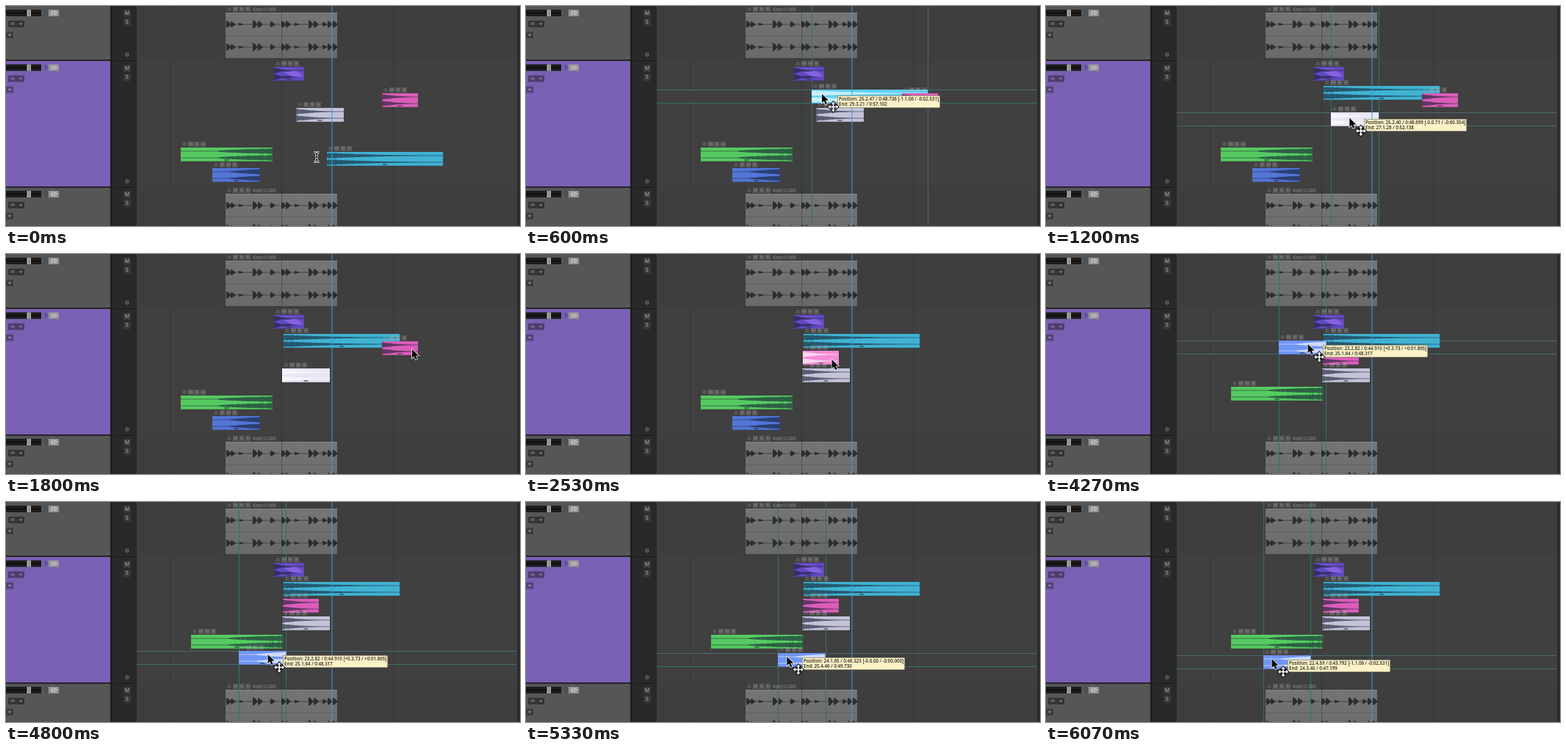
Write an HTML page with a canvas that moves like this. It is 700x300 px and loops after 6.13 s.

```html
<!DOCTYPE html>
<html>
<head>
<meta charset="utf-8">
<style>
html, body { margin: 0; width: 100%; height: 100%; overflow: hidden; background: #3f3f3f; }
canvas { display: block; }
</style>
</head>
<body>
<canvas id="stage" width="700" height="300"></canvas>
<script>
const ctx = document.getElementById('stage').getContext('2d');
const LOOP = 6130, STEP = 1000 / 15, ITEM_H = 19;
const SANS = '"Open Sans", "Noto Sans", sans-serif';

const decay = k => u => Math.pow(1 - u, k);
const rise = (from, k) => u => u < from ? 0 : Math.pow((u - from) / (1 - from), k);
const items = {
  purple: { x: 365, y: 83, w: 41, color: '#6249c0', lit: '#8b72ee', env: u => Math.max(0, 1 - u * 1.5) * (0.4 + 0.6 * Math.abs(Math.cos(u * 6))) },
  cyan: { x: 436.84, y: 199, w: 158.12, color: '#40b2d3', lit: '#5fd0f3', env: decay(2.3) },
  white: { x: 395, y: 139, w: 65, color: '#c4c3da', lit: '#e8e6f5', env: decay(2.4) },
  pink: { x: 512, y: 119, w: 49, color: '#da5db9', lit: '#f58bd8', env: decay(2.4) },
  green: { x: 237.84, y: 193, w: 124.85, color: '#55ca61', lit: '#72e67d', env: rise(0.4, 0.6) },
  blue: { x: 281.44, y: 221, w: 64.39, color: '#5275d8', lit: '#6f95f6', env: rise(0.35, 0.8) }
};

// path: [ms, item x, item y]; grab: pointer offset in the item; tip: tooltip offset
const drags = [
  { id: 'cyan', grab: [14, 6], tip: [35, 8], path: [[190, 436.84, 199], [400, 408, 150], [600, 389, 114], [800, 378, 109]] },
  { id: 'white', grab: [25, 8], tip: [45, 9], path: [[1070, 395, 139], [1400, 375.5, 156]] },
  { id: 'pink', grab: [41, 11], tip: [62, 12], path: [[1870, 512, 119], [2500, 377, 132]] },
  { id: 'green', grab: [97, 5], tip: [115, 7], path: [[3000, 237.84, 193], [3333, 248.84, 191], [3600, 252, 181]] },
  { id: 'blue', grab: [40, 5], tip: [60, 6], path: [[3930, 281.44, 221], [4267, 316.69, 118], [4400, 316.69, 118], [4800, 316.69, 203], [5000, 343.4, 206]] },
  { id: 'blue', grab: [12, 5], tip: [33, 6], path: [[5330, 343.4, 206], [5930, 295.56, 209], [6130, 295.56, 209]] }
];

const noise = n => { const s = Math.sin(n * 127.1) * 43758.5453; return s - Math.floor(s); };
const mix = (a, b, k) => a + (b - a) * k;

function along(path, t) {
  if (t <= path[0][0]) return path[0].slice(1);
  for (let i = 1; i < path.length; i++) {
    const [t0, x0, y0] = path[i - 1], [t1, x1, y1] = path[i];
    if (t < t1) {
      let k = (t - t0) / (t1 - t0);
      k = k * k * (3 - 2 * k);
      return [mix(x0, x1, k), mix(y0, y1, k)];
    }
  }
  return path[path.length - 1].slice(1);
}

function rect(x, y, w, h, color) {
  ctx.fillStyle = color;
  ctx.fillRect(x, y, w, h);
}

function label(text, x, y, size, color, weight = 400, align = 'left') {
  ctx.font = `${weight} ${size}px ${SANS}`;
  ctx.textAlign = align;
  ctx.textBaseline = 'middle';
  ctx.fillStyle = color;
  ctx.fillText(text, x, y);
}

function shape(points, fill, stroke, width = 1) {
  ctx.beginPath();
  points.forEach(([x, y]) => ctx.lineTo(x, y));
  ctx.closePath();
  if (stroke) { ctx.strokeStyle = stroke; ctx.lineWidth = width; ctx.stroke(); }
  ctx.fillStyle = fill;
  ctx.fill();
}

function ring(x, y, r, color) {
  ctx.beginPath();
  ctx.arc(x, y, r, 0, 7);
  ctx.strokeStyle = color;
  ctx.lineWidth = 1;
  ctx.stroke();
}

function itemIcons(x, y) {
  x = Math.round(x);
  y = Math.round(y);
  ctx.beginPath();
  ctx.arc(x + 5, y - 4.5, 2.8, 0, 7);
  ctx.fillStyle = 'rgba(160,160,160,.22)';
  ctx.fill();
  ['M', 'N', 'A'].forEach((c, i) => {
    const left = x + 10 + i * 8.5;
    rect(left, y - 8, 7, 7, 'rgba(170,170,170,.24)');
    label(c, left + 3.5, y - 4.3, 5.5, 'rgba(190,190,190,.55)', 400, 'center');
  });
}

function trackPanel(top, bottom, origin, color) {
  rect(0, top, 142, bottom - top, color);
  rect(0, origin + 5, 48, 9, '#1b1b1b');
  rect(0, origin + 9, 47, 1, '#050505');
  rect(28.5, origin + 5, 5.5, 9, '#a6a6a6');
  rect(31, origin + 5, 1, 9, '#777');
  rect(53, origin + 5, 1, 9, '#30516b');
  rect(55, origin + 7, 1, 5, '#30516b');
  rect(58, origin + 5, 14, 9, '#969696');
  rect(62, origin + 7, 1, 5, '#ddd');
  ring(66.5, origin + 9.5, 2, '#ddd');
  rect(3, origin + 20, 22, 9, 'rgba(0,0,0,.38)');
  label('IN', 6, origin + 24.6, 5.5, '#aaa');
  shape([[18, origin + 23.5], [22, origin + 23.5], [20, origin + 26]], '#999');
  rect(0, origin + 35, 10, 9, 'rgba(0,0,0,.3)');
  shape([[3, origin + 38.5], [7, origin + 38.5], [5, origin + 41]], '#aaa');
}

function trackButtons(top, end) {
  ['M', 'S'].forEach((c, i) => {
    rect(160, top + 5 + i * 12, 10, 10, '#393939');
    label(c, 165, top + 10.4 + i * 12, 7, '#a5a5a5', 600, 'center');
  });
  ring(165, end - 7, 2.3, '#777');
  shape([[163, end - 5], [167, end - 9]], '#777', '#777', 0.8);
}

function drumClip(y) {
  const x = 299, w = 152, h = 62;
  const shade = ctx.createLinearGradient(0, y, 0, y + h);
  shade.addColorStop(0, '#757575');
  shade.addColorStop(1, '#696969');
  rect(x, y, w, h, shade);
  rect(x, y, w, 1, '#828282');
  rect(x, y + 31, w, 1, '#616161');
  // [offset, loudness] of each drum hit
  const hits = [[2, 5], [8, 4], [19, 2], [38, 6], [45, 5], [62, 4], [77, 5], [83, 5], [95, 2], [114, 6], [121, 5], [133, 3], [140, 5], [147, 5]];
  for (const mid of [y + 16, y + 47]) {
    rect(x, mid - 0.5, w, 1, '#454545');
    for (const [dx, a] of hits)
      shape([[x + dx - 1, mid - a], [x + dx + 1.5, mid - a * 0.8], [x + dx + 6, mid], [x + dx + 1.5, mid + a * 0.8], [x + dx - 1, mid + a]], '#2d2d2d');
  }
  itemIcons(x, y);
  label('Rate:0.686', 336, y - 4, 6.5, '#929292');
}

function itemBody(item, x, y, selected) {
  const { w, env } = item;
  rect(x, y, w, ITEM_H, selected ? item.lit : item.color);
  ctx.save();
  ctx.beginPath();
  ctx.rect(x, y, w, ITEM_H);
  ctx.clip();
  if (item === items.purple) {
    ctx.beginPath();
    ctx.moveTo(x + w * 0.35, y + 2);
    ctx.quadraticCurveTo(x + w * 0.8, y + 2, x + w, y + 15);
    ctx.quadraticCurveTo(x + w * 0.65, y + 15, x + w * 0.35, y + 8);
    ctx.fillStyle = '#8462e0';
    ctx.fill();
  }
  const ink = selected ? 'rgba(255,255,255,.65)' : 'rgba(22,32,50,.62)';
  for (const mid of [y + 5, y + 14]) {
    for (let i = 0; i < w; i++) {
      const a = 0.4 + 3.8 * env(i / w) * (0.7 + 0.3 * noise(i + Math.round(w)));
      rect(x + i, mid - a, 1, a * 2, ink);
    }
  }
  rect(x, y + ITEM_H - 1, w, 1, 'rgba(0,0,0,.15)');
  rect(x + w / 2 - 3, y + ITEM_H - 3, 6, 2, 'rgba(50,50,60,.55)');
  ctx.restore();
}

function guides(x, y, w) {
  for (const gx of [x, x + w]) rect(Math.round(gx), 0, 1, 300, '#35716f');
  rect(178, Math.round(y), 518, 1, '#4b6a6a');
  rect(178, Math.round(y) + ITEM_H - 1, 518, 1, '#35716f');
}

// Timeline runs at 120 bpm in 4/4
const seconds = x => 48.736 + (x - 389) / 18.9;
function barsAndTime(sec, first, sign = '') {
  const hundredths = Math.round(Math.abs(sec) * 200 + first * 0.2);
  const bar = Math.floor(hundredths / 400) + first, beat = Math.floor(hundredths % 400 / 100) + first;
  const part = String(hundredths % 100).padStart(2, '0');
  return `${sign}${bar}.${beat}.${part} / ${sign}0:${Math.abs(sec).toFixed(3).padStart(6, '0')}`;
}

function tooltip(x, y, drag, itemX, w) {
  const start = seconds(itemX), delta = start - seconds(drag.path[0][1]);
  const line1 = `Position: ${barsAndTime(start, 1)} [${barsAndTime(delta, 0, delta < 0 ? '-' : '+')}]`;
  ctx.font = `600 6.2px ${SANS}`;
  const width = Math.round(ctx.measureText(line1).width) + 4;
  x = Math.round(x);
  y = Math.round(y);
  rect(x, y, width, 17, '#4a483c');
  rect(x + 0.5, y + 0.5, width - 1, 16, '#fcf2c7');
  label(line1, x + 2, y + 5, 6.2, '#25231c', 600);
  label(`End: ${barsAndTime(start + w / 18.9, 1)}`, x + 2, y + 12.6, 6.2, '#25231c', 600);
}

function arrowCursor(x, y) {
  const outline = [[0, 0], [0, 12], [2.7, 9.6], [4.8, 14], [7, 13], [5, 8.8], [8.8, 8.5]];
  shape(outline.map(([dx, dy]) => [x + dx, y + dy]), '#080808', '#eee', 1.5);
}

function moveCursor(x, y) {
  const arm = [[-0.8, -0.8], [-0.8, -4], [-2.7, -4], [0, -7], [2.7, -4], [0.8, -4], [0.8, -0.8]];
  const points = [];
  for (let q = 0; q < 4; q++)
    for (const [a, b] of arm)
      points.push([[a, b], [-b, a], [-a, -b], [b, -a]][q]);
  shape(points.map(([dx, dy]) => [x + dx, y + dy]), '#fff', '#111', 2);
}

function beamCursor(x, y) {
  ctx.beginPath();
  for (const side of [-1, 1]) {
    ctx.moveTo(x - 3.5, y + side * 6.5);
    ctx.quadraticCurveTo(x, y + side * 6.5, x, y + side * 3);
    ctx.quadraticCurveTo(x, y + side * 6.5, x + 3.5, y + side * 6.5);
  }
  ctx.moveTo(x, y - 4);
  ctx.lineTo(x, y + 4);
  ctx.moveTo(x - 2, y);
  ctx.lineTo(x + 2, y);
  for (const [color, width] of [['#e8e8e8', 3], ['#111', 1]]) {
    ctx.strokeStyle = color;
    ctx.lineWidth = width;
    ctx.stroke();
  }
}

function pointerAt(t, active) {
  const held = (d, p) => [p[0] + d.grab[0], p[1] + d.grab[1]];
  if (active) return held(active, along(active.path, t));
  const next = drags.findIndex(d => t < d.path[0][0]);
  const to = drags[next], prev = drags[next - 1];
  const from = prev ? held(prev, along(prev.path, t)) : [423, 206];
  const t0 = prev ? prev.path[prev.path.length - 1][0] : 0;
  return along([[t0, ...from], [to.path[0][0] - 70, ...held(to, to.path[0].slice(1))]], t);
}

function backdrop() {
  rect(0, 0, 700, 300, '#3e3e3e');
  rect(178, 74, 518, 173, '#404040');
  rect(696, 0, 4, 300, '#2c2c2c');
  rect(0, 0, 142, 300, '#242424');
  rect(142, 0, 36, 300, '#292929');
  rect(142, 0, 3, 300, '#1f1f1f');
  rect(142, 74, 36, 1, '#1b1b1b');
  rect(142, 247, 36, 1, '#1b1b1b');
  trackPanel(0, 73, 0, '#565656');
  trackPanel(75, 246, 74.5, '#7a60b4');
  trackPanel(248, 300, 247, '#565656');
  trackButtons(0, 73);
  trackButtons(75, 246);
  trackButtons(247, 330);
  drumClip(9);
  drumClip(256);
  for (const x of [223, 375, 527]) rect(x, 0, 1, 300, 'rgba(40,40,40,.4)');
}

function draw(t) {
  const active = drags.find(d => t >= d.path[0][0] && t < d.path[d.path.length - 1][0]);
  const latest = drags.filter(d => t >= d.path[0][0]).pop();
  const placed = Object.entries(items).map(([id, item]) => {
    const drag = drags.filter(d => d.id === id && t >= d.path[0][0]).pop();
    const [x, y] = drag ? along(drag.path, t) : [item.x, item.y];
    return { id, item, x, y };
  });
  const moving = active && placed.find(p => p.id === active.id);

  backdrop();
  if (moving) guides(moving.x, moving.y, moving.item.w);
  for (const p of placed)
    itemBody(p.item, Math.round(p.x), Math.round(p.y), latest && latest.id === p.id);
  for (const p of placed) itemIcons(p.x, p.y);
  rect(443.5, 0, 1, 300, '#3f9bd2');

  const [px, py] = pointerAt(t, active);
  if (moving) {
    tooltip(moving.x + active.tip[0], moving.y + active.tip[1], active, moving.x, moving.item.w);
    arrowCursor(px, py);
    moveCursor(px + 15.5, py + 17.5);
  } else if (placed.some(p => px >= p.x && px < p.x + p.item.w && py >= p.y && py < p.y + ITEM_H)) {
    arrowCursor(px, py);
  } else {
    beamCursor(px, py);
  }
}

const began = performance.now();
function tick() {
  const t = (performance.now() - began) % LOOP;
  draw(Math.floor((t + 4) / STEP) * STEP);
  requestAnimationFrame(tick);
}
tick();
</script>
</body>
</html>
```
